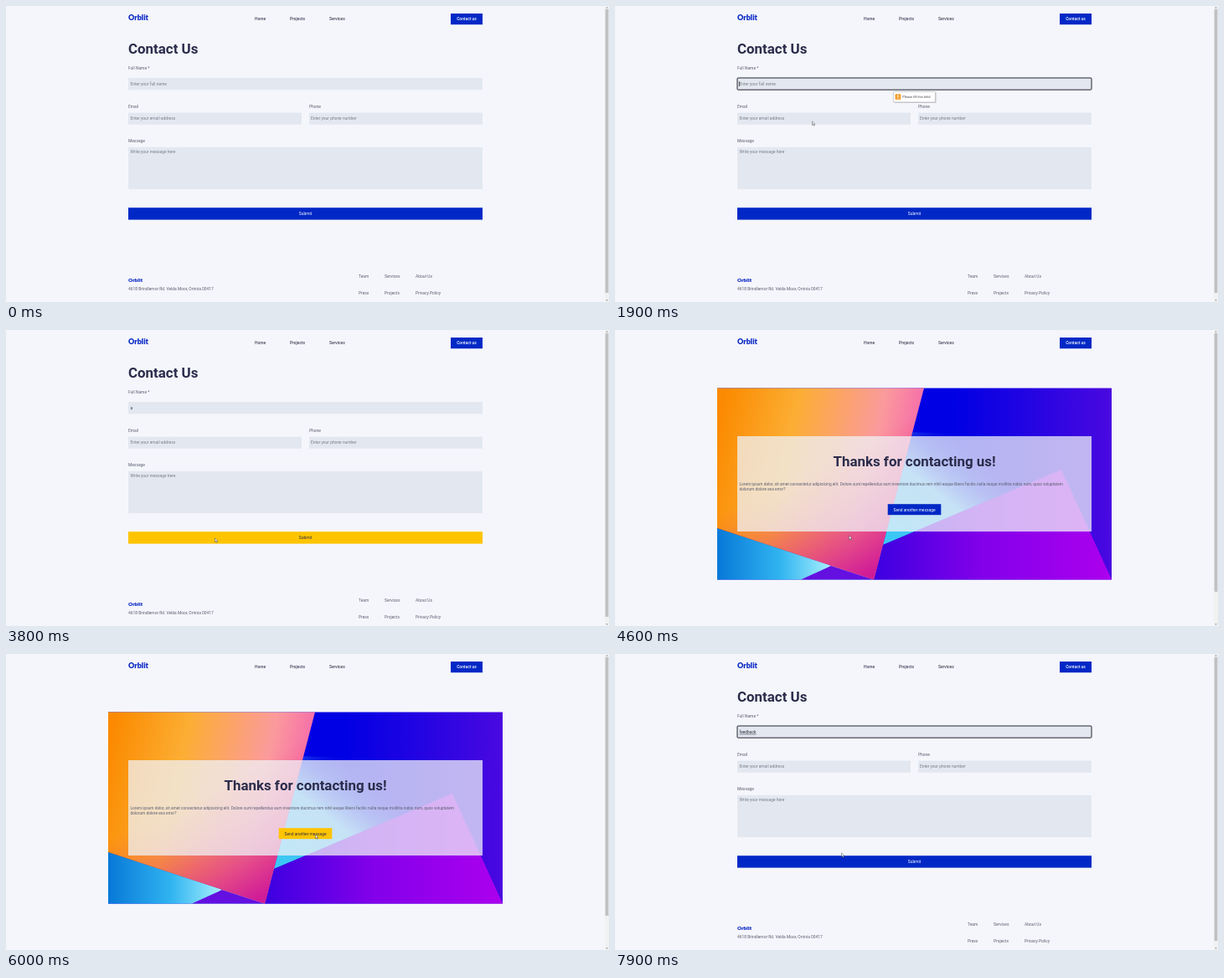
An HTML page that plays this animation: 720x354 px, repeating every 8 s.

```html
<!DOCTYPE html>
<html lang="en">
<head>
<meta charset="utf-8">
<title>Contact form</title>
<style>
  html, body { margin: 0; height: 100%; overflow: hidden; background: #f5f6fb; }
  svg { display: block; width: 100vw; height: 100vh; }
  text { font: 4.9px Roboto, sans-serif; fill: #5c5e70; }
  .logo { font: 900 9px Lato, sans-serif; fill: #0a28c4; }
  .small { font-size: 6.4px; }
  .title { font: 700 16.9px Roboto, sans-serif; fill: #2b2c4b; }
  .nav { font-weight: 500; fill: #44465c; }
  .hint { fill: #777b88; }
  .dark { fill: #2b2c3c; }
  .tip { font-size: 4px; fill: #444; }
  .mid { text-anchor: middle; }
  .on { fill: #fff; font-weight: 500; }
  .field { fill: #e3e8f0; }
  .blue { fill: #0128c6; }
</style>
</head>
<body>
<svg viewBox="0 0 720 354" preserveAspectRatio="none">
  <defs>
    <linearGradient id="warm" x1="0" y1=".2" x2="1" y2=".4">
      <stop offset="0" stop-color="#fb8a00"/><stop offset=".35" stop-color="#fcae34"/>
      <stop offset=".75" stop-color="#fb9a9c"/><stop offset="1" stop-color="#f45fae"/>
    </linearGradient>
    <linearGradient id="ember" gradientUnits="userSpaceOnUse" x1="225" y1="170" x2="290" y2="298">
      <stop offset="0" stop-color="#f04a50" stop-opacity="0"/><stop offset="1" stop-color="#d01c98"/>
    </linearGradient>
    <linearGradient id="deep">
      <stop offset=".6" stop-color="#0000e4"/><stop offset="1" stop-color="#4a08e0"/>
    </linearGradient>
    <linearGradient id="ice" gradientUnits="userSpaceOnUse" x1="330" y1="245" x2="420" y2="130">
      <stop offset="0" stop-color="#3cc8f4"/><stop offset=".5" stop-color="#50b4f0"/>
      <stop offset="1" stop-color="#0000e4" stop-opacity="0"/>
    </linearGradient>
    <linearGradient id="violet">
      <stop offset="0" stop-color="#3c00e0"/><stop offset=".45" stop-color="#8200ea"/>
      <stop offset="1" stop-color="#ac00ee"/>
    </linearGradient>
    <linearGradient id="sea">
      <stop offset="0" stop-color="#0878d8"/><stop offset=".4" stop-color="#30b4f0"/>
      <stop offset=".75" stop-color="#b0f4fe"/><stop offset="1" stop-color="#70d0f8"/>
    </linearGradient>
  </defs>

  <rect width="720" height="354" fill="#f5f6fb"/>
  <text class="logo" x="146" y="17">Orblit</text>
  <text class="nav" x="297" y="17.2">Home</text>
  <text class="nav" x="339" y="17.2">Projects</text>
  <text class="nav" x="386" y="17.2">Services</text>
  <rect class="blue" x="531" y="9" width="38" height="13.2"/>
  <text class="mid on" x="550" y="17.2">Contact us</text>

  <g id="form">
    <text class="title" x="146" y="57.4">Contact Us</text>
    <text x="146" y="75.5">Full Name *</text>
    <text x="146" y="121.8">Email</text>
    <text x="362" y="121.8">Phone</text>
    <text x="146" y="163">Message</text>
    <rect class="field" x="146" y="86" width="423" height="14.3"/>
    <rect class="field" x="146" y="127.6" width="207" height="14.2"/>
    <rect class="field" x="362" y="127.6" width="207" height="14.2"/>
    <rect class="field" x="146" y="168.8" width="423" height="50.4"/>
    <text class="hint" x="148.5" y="136.2">Enter your email address</text>
    <text class="hint" x="364" y="136.2">Enter your phone number</text>
    <text class="hint" x="148.5" y="175.8">Write your message here</text>
    <text id="name" x="148.5" y="94.8"></text>
    <g id="focus">
      <rect x="146" y="86" width="423" height="14.2" rx="1" fill="none" stroke="#25262e"/>
      <path id="caret" d="M148.4 90.2v6" stroke="#111" stroke-width=".7"/>
    </g>
    <g id="tip">
      <rect x="333" y="103.2" width="50.6" height="12.8" rx="1" fill="#000" opacity=".18"/>
      <rect x="332.4" y="102.4" width="50" height="12.6" rx="1" fill="#fff" stroke="#b8b8bc" stroke-width=".7"/>
      <rect x="334.5" y="105.2" width="6.8" height="6.8" rx="1" fill="#f5a030"/>
      <path d="M337.9 106.4v2.8m0 .8v1" stroke="#fff"/>
      <text class="tip" x="343.2" y="110.4">Please fill this field</text>
    </g>
    <rect id="submit" x="146" y="241.2" width="423" height="14.4"/>
    <text id="submitText" class="mid" x="357.5" y="250.2">Submit</text>
    <text class="logo small" x="146" y="329.8">Orblit</text>
    <text x="146" y="340.2">4618 Brindlemor Rd. Velda Moor, Orrinia 00417</text>
    <text x="421" y="324.8">Team</text>
    <text x="452" y="324.8">Services</text>
    <text x="489" y="324.8">About Us</text>
    <text x="421" y="344.8">Press</text>
    <text x="452" y="344.8">Projects</text>
    <text x="489" y="344.8">Privacy Policy</text>
  </g>

  <g id="thanks">
    <rect x="122" y="69.5" width="471" height="229" fill="url(#deep)"/>
    <path d="M355 122L480 127 533 167 320 257z" fill="url(#ice)"/>
    <path d="M309 298.5L320 257 533 167 593 298.5z" fill="url(#violet)"/>
    <path d="M122 237L309 298.5H122z" fill="url(#sea)"/>
    <path d="M222 298.5L258 282 309 298.5z" fill="#6410e0"/>
    <path id="slab" d="M122 69.5H369L309 298.5 122 237z" fill="url(#warm)"/>
    <path d="M122 69.5H369L309 298.5 122 237z" fill="url(#ember)"/>
    <rect x="146" y="127" width="423" height="114" fill="#f1f3f8" opacity=".74"/>
    <text class="title mid" x="357.5" y="163">Thanks for contacting us!</text>
    <text style="font-size:4.8px" x="148.5" y="186.4">Lorem ipsum dolor, sit amet consectetur adipisicing elit. Dolore sunt repellendus eum inventore ducimus rem nihil eaque libero facilis nulla neque mollitia nobis nam, quos voluptatem</text>
    <text style="font-size:4.8px" x="148.5" y="192">dolorum dolore eos error?</text>
    <rect id="again" x="325.7" y="208.2" width="63.6" height="13"/>
    <text id="againText" class="mid" x="357.5" y="216.6">Send another message</text>
  </g>

  <rect x="715" width="5" height="354" fill="#f1f1f2"/>
  <rect id="thumb" x="715.6" y="4" width="3.8" fill="#c1c1c3"/>
  <path d="M716.3 2.6l1.2-1.4 1.2 1.4zM716.3 351.4l1.2 1.4 1.2-1.4z" fill="#666"/>
  <path id="cursor" d="M0 0v4.6l1.1-1 .8 1.7.8-.4-.8-1.6h1.5z" fill="#fff" stroke="#333" stroke-width=".45"/>
</svg>
<script>
const LOOP = 8000;
const $ = id => document.getElementById(id);
const clamp = v => Math.max(0, Math.min(1, v));
const within = (t, a, b) => t >= a && t < b;
const show = (id, on) => $(id).style.display = on ? "" : "none";

// Pointer stops: time, x, y
const stops = [
  [300, 430, 356], [1100, 262, 249], [1450, 262, 249], [1900, 235.5, 138],
  [2200, 222, 94], [3200, 222, 94], [3600, 249.5, 249], [4300, 249.5, 249],
  [4600, 279.5, 246], [5200, 369.5, 216], [6200, 369.5, 216], [6800, 255, 94],
  [7600, 255, 94], [7900, 270.5, 238], [8000, 270.5, 238]
];

function pointer(t) {
  const i = stops.findIndex(s => s[0] > t);
  if (i < 1) return [430, 360];
  const [t0, x0, y0] = stops[i - 1], [t1, x1, y1] = stops[i];
  const k = (t - t0) / (t1 - t0), e = k * k * (3 - 2 * k);
  return [x0 + (x1 - x0) * e, y0 + (y1 - y0) * e];
}

const hover = (t, on, off) => clamp((t - on) / 300) - clamp((t - off) / 300);
const mix = (a, b, k) => `rgb(${a.map((v, i) => Math.round(v + (b[i] - v) * k))})`;

function paint(id, k) {
  $(id).style.fill = mix([1, 40, 198], [255, 196, 0], k);
  $(id + "Text").style.fill = mix([255, 255, 255], [43, 44, 75], k);
}

function nameAt(t) {
  if (t >= 7600) return "feedback".slice(0, 2 + Math.floor((t - 7600) / 100) * 2);
  return within(t, 2900, 6200) ? "a" : "";
}

function draw(t) {
  const sent = within(t, 4300, 6200);
  show("form", !sent);
  show("thanks", sent);
  $("thumb").setAttribute("height", sent ? 309 : 339);

  const typed = nameAt(t);
  $("name").textContent = typed || "Enter your full name";
  $("name").setAttribute("class", typed ? "dark" : "hint");
  $("name").style.textDecoration = typed.length > 1 ? "underline" : "none";

  show("focus", within(t, 1400, 3650) || t >= 7200);
  const blink = t >= 7200 ? t - 7200 : t - 900;
  show("caret", blink % 1000 < 500);
  $("caret").setAttribute("transform", `translate(${typed ? typed.length * 2.5 : 0})`);
  $("tip").style.opacity = clamp((t - 1400) / 150) - clamp((t - 2300) / 150);

  paint("submit", hover(t, 900, 1600) + hover(t, 3430, 6200));
  paint("again", hover(t, 5150, 9000));
  $("cursor").setAttribute("transform", `translate(${pointer(t)})`);
}

function tick(now) {
  draw(now % LOOP);
  requestAnimationFrame(tick);
}
requestAnimationFrame(tick);
</script>
</body>
</html>
```
